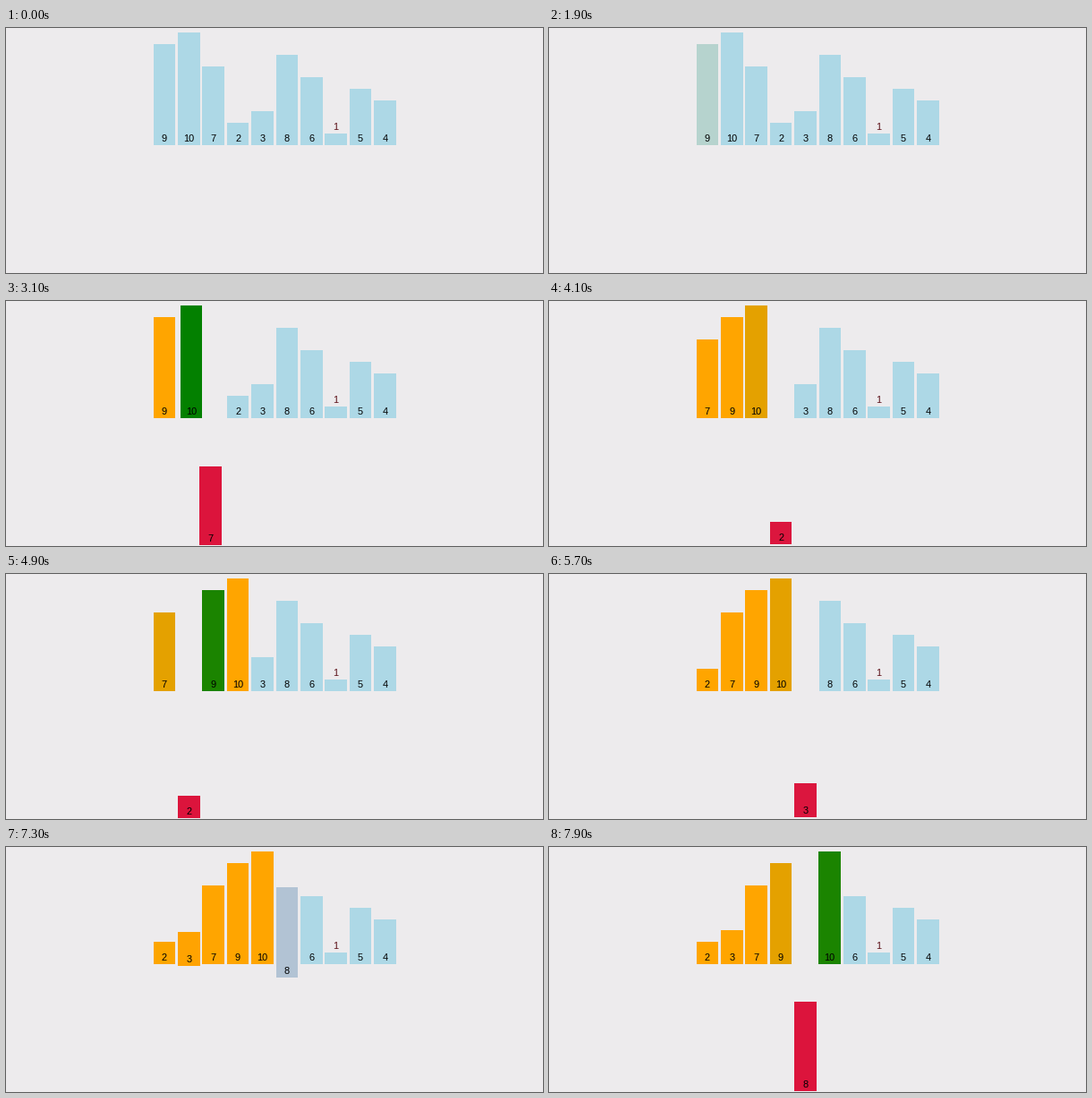
A matplotlib script for the animation above (8 s loop, 600 by 274 pixels).

```python
import numpy as np
import matplotlib.pyplot as plt
from matplotlib.animation import FuncAnimation
from matplotlib.colors import to_rgb
from matplotlib.patches import Rectangle

W, H, DPI = 600, 274, 100
VALUES = [9, 10, 7, 2, 3, 8, 6, 1, 5, 4]

LEFT, PITCH, BAR_W = 164.5, 27.4, 24.7
BASE, UNIT, DROP = 131, 12.6, 142.4
FONT_PX = 11

PLAIN, SORTED, COMPARE, KEY = map(to_rgb, ("#add8e6", "#ffa500", "#008000", "#dc143c"))

FRAME_MS, FRAMES = 100, 80
START_MS, STEP_MS, TWEEN_MS, LEAD_MS = 1900, 200, 235, 70


def sort_steps(values):
    """Targets (slot, lowered, r, g, b) for every bar at each insertion sort step."""
    bars = np.array([(i, 0, *PLAIN) for i in range(len(values))], float)
    order = list(range(len(values)))
    steps = [bars.copy()]

    def paint(i, color):
        bars[i, 2:] = color

    def record():
        steps.append(bars.copy())

    paint(0, SORTED)
    record()
    for n in range(1, len(values)):
        key = order[n]
        bars[key, 1] = 1
        paint(key, KEY)
        record()
        j = n - 1
        while j >= 0:
            other = order[j]
            for i in order[:n + 1]:
                if i != key:
                    paint(i, SORTED)
            paint(other, COMPARE)
            record()
            if values[other] < values[key]:
                break
            order[j], order[j + 1] = key, other
            bars[other, 0], bars[key, 0] = j + 1, j
            record()
            j -= 1
        for i in order[:n + 1]:
            paint(i, SORTED)
        bars[key, 1] = 0
        record()
    return steps


def ease(t):
    t = min(max(t, 0), 1)
    return 4 * t ** 3 if t < 0.5 else 1 - 4 * (1 - t) ** 3


# Each step cuts the previous tween short and carries on from where it was.
targets = sort_steps(VALUES)
starts = [targets[0]]
for goal in targets[1:]:
    starts.append(starts[-1] + (goal - starts[-1]) * ease(STEP_MS / TWEEN_MS))


def pose(frame):
    t = frame * FRAME_MS - START_MS + LEAD_MS
    if t < 0:
        return targets[0]
    k, local = divmod(t, STEP_MS)
    return starts[k] + (targets[k + 1] - starts[k]) * ease(local / TWEEN_MS)


fig = plt.figure(figsize=(W / DPI, H / DPI), dpi=DPI, facecolor="#edebed")
ax = fig.add_axes([0, 0, 1, 1])
ax.set_xlim(0, W)
ax.set_ylim(H, 0)
ax.axis("off")

rects, labels = [], []
for v in VALUES:
    rects.append(ax.add_patch(Rectangle((0, 0), BAR_W, v * UNIT, lw=0)))
    labels.append(ax.text(0, 0, str(v), ha="center", va="baseline",
                          color="black" if v > 1 else "#5c1018",
                          family="Liberation Sans", size=FONT_PX * 72 / DPI, zorder=3))


def draw(frame):
    for v, rect, label, (slot, low, *rgb) in zip(VALUES, rects, labels, pose(frame)):
        x = LEFT + slot * PITCH
        bottom = BASE + low * DROP
        rect.set_xy((x, bottom - v * UNIT))
        rect.set_facecolor(np.clip(rgb, 0, 1))
        label.set_position((x + BAR_W / 2, bottom - (4 if v > 1 else 16.5)))
    return rects + labels


anim = FuncAnimation(fig, draw, frames=FRAMES, interval=FRAME_MS, repeat=True, repeat_delay=0)
plt.show()
```
